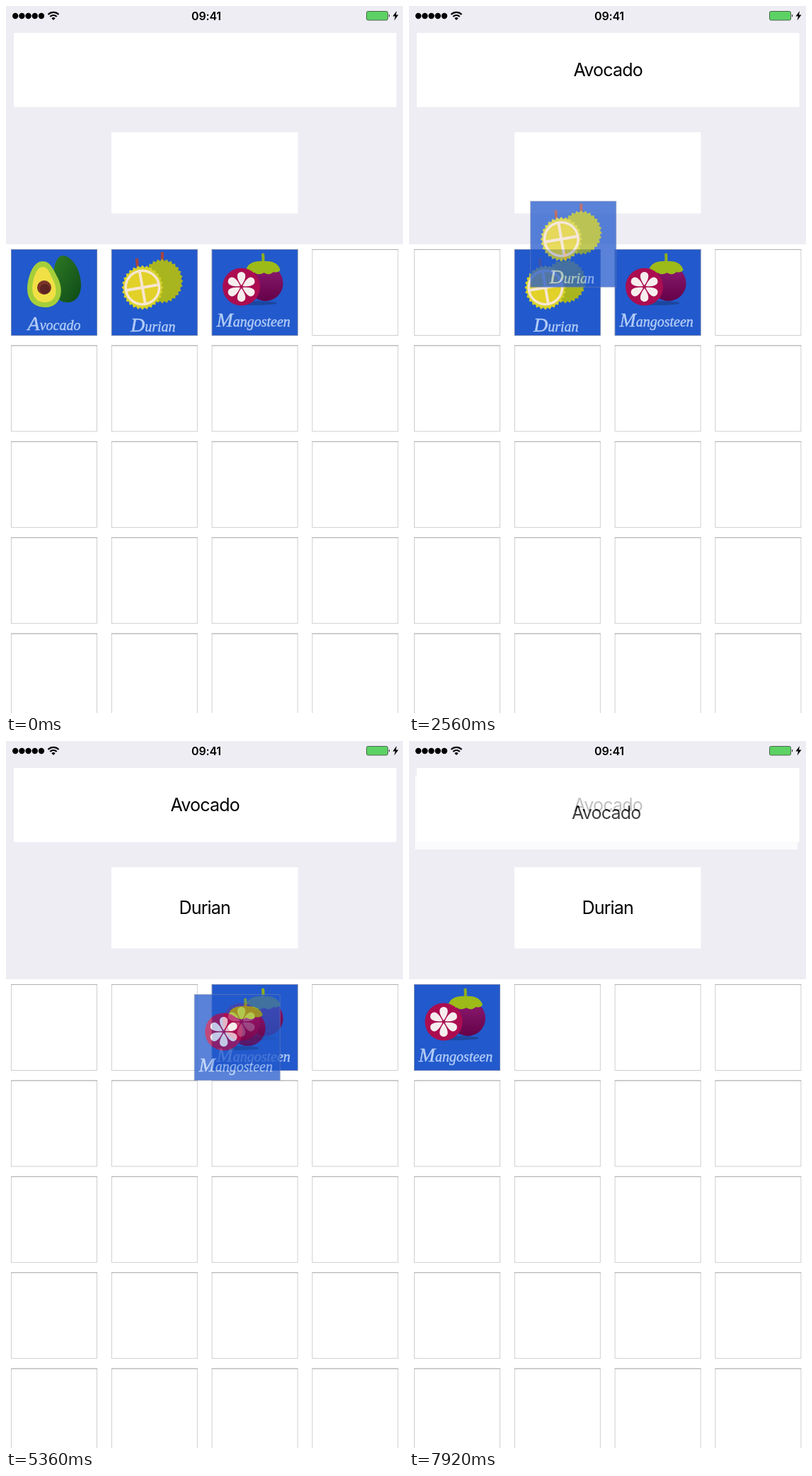
Animation of 561 by 997 pixels, one loop 8 s. Source, as an HTML page:

```html
<!DOCTYPE html>
<html lang="en">
<head>
<meta charset="utf-8">
<title>Drag and drop fruit</title>
<style>
html, body { margin: 0; width: 100%; height: 100%; overflow: hidden; background: #fff; }
svg { display: block; width: 561px; height: 997px; }
text { font-family: Inter, Roboto, sans-serif; text-anchor: middle; }
.clock { font-size: 16px; font-weight: 600; letter-spacing: -.2px; }
.label { font-size: 25px; letter-spacing: -.8px; }
.script { font: italic 20px "Liberation Serif", "Noto Serif", serif; fill: #b3cdf6; stroke: #b3cdf6; stroke-width: .4; }
.cap { font-size: 28px; }
</style>
</head>
<body>
<svg viewBox="0 0 561 997">
  <defs>
    <linearGradient id="skin" x2="1" y2="1"><stop stop-color="#2f7a24"/><stop offset="1" stop-color="#0d4a18"/></linearGradient>
    <linearGradient id="plum" x2="0" y2="1"><stop stop-color="#8e1a72"/><stop offset="1" stop-color="#640248"/></linearGradient>
    <rect id="tile" x=".5" y=".5" width="121" height="121" fill="#2259cc" stroke="#6d7fae" stroke-width=".8"/>

    <g id="Avocado">
      <use href="#tile"/>
      <path d="M74 9C87 10 99 30 99 50C99 66 91 75 80 75C66 75 58 62 59 44C60 26 64 8 74 9Z" fill="url(#skin)"/>
      <path d="M45 17C56 17 60 29 66 40C77 62 68 82 49 82C29 82 20 67 24 46C27 30 34 17 45 17Z" fill="#a5cf3a"/>
      <path d="M45 25C53 25 55 35 60 44C68 61 62 75 48 75C34 75 28 63 31 47C33 35 38 25 45 25Z" fill="#f1e045"/>
      <circle cx="47" cy="54" r="10" fill="#7c3329"/>
      <circle cx="48" cy="56" r="7" fill="#5c2422"/>
      <text class="script" x="61" y="114"><tspan class="cap">A</tspan>vocado</text>
    </g>

    <g id="Durian">
      <use href="#tile"/>
      <path d="M37 25L36 13M72 17L72 4" stroke="#a5443f" stroke-width="4"/>
      <g id="husks"></g>
      <circle cx="44" cy="54" r="25.5" fill="#f7e6d0"/>
      <circle cx="44" cy="54" r="22" fill="#e2d128"/>
      <path d="M40 31L48 77M21 58L67 50" stroke="#f7e6d0" stroke-width="4"/>
      <text class="script" x="59" y="116"><tspan class="cap">D</tspan>urian</text>
    </g>

    <g id="Mangosteen">
      <use href="#tile"/>
      <ellipse cx="62" cy="76" rx="30" ry="3" fill="#1c479f"/>
      <circle cx="76" cy="48" r="25" fill="url(#plum)"/>
      <path d="M73 20C72 13 74 11 72 6" fill="none" stroke="#8fae1e" stroke-width="4"/>
      <path d="M49 28C52 19 61 16 73 17C86 16 94 20 97 29C95 33 90 33 87 32C84 36 78 36 74 33C69 36 64 36 61 33C57 34 51 33 49 28Z" fill="#9cba18"/>
      <circle cx="42" cy="53" r="26.5" fill="#ab0d50"/>
      <g id="petals" fill="#f6eeee"></g>
      <text class="script" x="59" y="109"><tspan class="cap">M</tspan>angosteen</text>
    </g>
  </defs>

  <rect width="561" height="997" fill="#fff"/>
  <rect width="561" height="336" fill="#efedf4"/>
  <g id="dots"></g>
  <g fill="none" stroke="#000" stroke-width="2.2">
    <path d="M59.500 12A10.500 10.500 0 0 1 74.500 12M62.300 15A6.500 6.500 0 0 1 71.700 15"/>
    <path d="M67 20L64.300 17.300A4 4 0 0 1 69.700 17.300Z" fill="#000" stroke="none"/>
  </g>
  <text class="clock" x="283" y="20">09:41</text>
  <rect x="509.500" y="7.500" width="30" height="12.500" rx="2" fill="#5dd264" stroke="#4b6650"/>
  <path d="M541 11.500Q543 13.500 541 16Z"/>
  <path d="M552 7L546.500 14.500H550L548.500 20.500L554.500 12.500H551Z"/>
  <g id="slots"></g>
  <g id="live"></g>
</svg>
<script>
const $ = id => document.getElementById(id);
const range = n => [...Array(n).keys()];
const join = (n, f) => range(n).map(f).join('');

// Fruit details
const husk = (cx, cy, fill) => {
  const pts = range(56).map(i => {
    const a = i * Math.PI / 28, k = i % 2 ? .9 : 1;
    return (cx + 29.5 * k * Math.cos(a)).toFixed(1) + ',' + (cy + 31.5 * k * Math.sin(a)).toFixed(1);
  });
  return `<polygon points="${pts.join(' ')}" fill="${fill}"/>`;
};
$('husks').innerHTML = husk(72, 45, '#a9b51f') + husk(44, 54, '#d6d22a');
$('petals').innerHTML = join(6, i =>
  `<path d="M42 51C36 43 33 33 42 32C51 33 48 43 42 51Z" transform="rotate(${i * 60} 42 53)"/>`);
$('dots').innerHTML = join(5, i => `<circle cx="${13.2 + i * 9.2}" cy="14" r="4.2"/>`);

// Drop targets: two wide boxes, then a grid of cells
const boxes = [{x: 11, y: 38, w: 540.5, h: 104.5}, {x: 149, y: 178, w: 263.5, h: 114.5}];
const cells = range(20).map(i => ({x: 7 + i % 4 * 141.8, y: 343 + (i >> 2) * 135.4, w: 122, h: 122}));
const slots = [...boxes, ...cells];
const rect = (s, attrs) => `<rect x="${s.x}" y="${s.y}" width="${s.w}" height="${s.h}" ${attrs}/>`;
const inset = s => ({x: s.x + .5, y: s.y + .5, w: s.w - 1, h: s.h - 1});
$('slots').innerHTML = boxes.map(b => rect(b, 'fill="#fff"')).join('') + cells.map(c =>
  rect(inset(c), 'fill="#fff" stroke="#ccc8cb" stroke-width=".9"') +
  `<path d="M${c.x} ${c.y + .5}h122" stroke="#b2b0b2"/>`).join('');

// from/to are slot numbers; the preview shows at "show", moves in start..end by dx, dy
const drags = [
  {name: 'Avocado', from: 2, to: 0, show: 320, start: 400, end: 1280, drop: 1440, dx: 213, dy: -311, bend: 0},
  {name: 'Durian', from: 3, to: 1, show: 2080, start: 2160, end: 3040, drop: 3360, dx: 52, dy: -158, bend: 0},
  {name: 'Mangosteen', from: 4, to: 2, show: 4960, start: 5120, end: 6400, drop: 6400, dx: -270, dy: 7, bend: 40},
  {name: 'Avocado', from: 0, to: 0, show: 7680, start: 7760, end: 7920, drop: 8000, dx: -2.5, dy: 10.5, bend: 0}
];

const item = (name, slot) => {
  const s = slots[slot];
  return slot > 1
    ? `<use href="#${name}" x="${s.x}" y="${s.y}"/>`
    : `<text class="label" x="${s.x + s.w / 2}" y="${s.y + s.h / 2 + 9}">${name}</text>`;
};

function draw(t) {
  const placed = drags.slice(0, 3).map(d => ({name: d.name, slot: t < d.drop ? d.from : d.to}));
  const drag = drags.find(d => t >= d.show && t < d.drop);
  let under = '', over = '';
  if (drag) {
    const s = slots[drag.from];
    const u = Math.min(1, Math.max(0, (t - drag.start) / (drag.end - drag.start)));
    const k = u * u * (3 - 2 * u);
    const dx = drag.dx * k, dy = drag.dy * k + drag.bend * 4 * k * (1 - k);
    const cx = s.x + s.w / 2 + dx, cy = s.y + s.h / 2 + dy;
    const hover = slots.findIndex((b, i) => !placed.some(p => p.slot === i) &&
      cx > b.x && cx < b.x + b.w && cy > b.y && cy < b.y + b.h);
    if (hover >= 0) under = rect(inset(slots[hover]), 'fill="#f4b477" stroke="#c9b8a8"');
    over = `<g opacity=".75" transform="translate(${dx} ${dy})">` +
      (drag.from < 2 ? rect(s, 'fill="#fff"') : '') + item(drag.name, drag.from) + '</g>';
  }
  $('live').innerHTML = under + placed.map(p => item(p.name, p.slot)).join('') + over;
}

const began = performance.now();
let last = -1;
function tick(now) {
  const t = Math.floor(Math.max(0, now - began) % 8000 / 80) * 80;
  if (t !== last) draw(last = t);
  requestAnimationFrame(tick);
}
tick(began);
</script>
</body>
</html>
```
